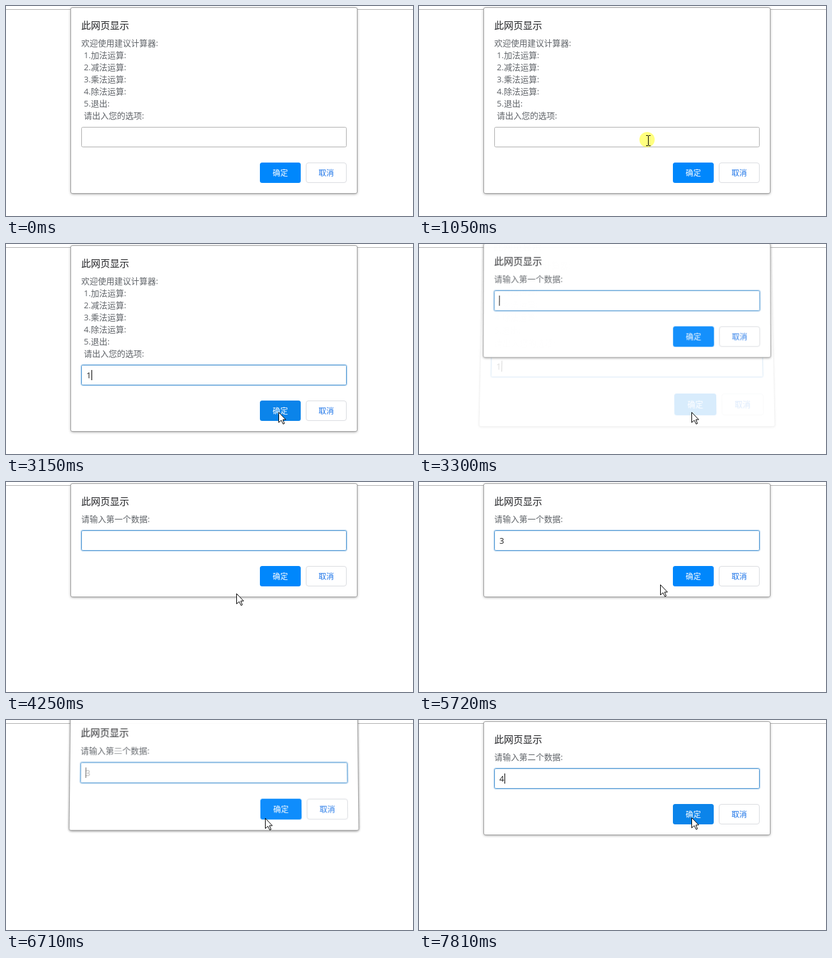
An HTML page with a canvas for the animation above (8 s loop, 638x330 px).

```html
<!DOCTYPE html>
<html lang="zh">
<head>
<meta charset="utf-8">
<title>计算器</title>
<style>
html, body { margin: 0; width: 100%; height: 100%; overflow: hidden; background: #fff; }
canvas { display: block; }
</style>
</head>
<body>
<canvas id="stage" width="638" height="330"></canvas>
<script>
const W = 638, H = 330, LOOP = 8000, MID = 326;
const FONT = '"Open Sans", "Noto Sans CJK SC", "Noto Sans CJK", sans-serif';
const ctx = document.getElementById('stage').getContext('2d');
const layer = document.createElement('canvas');
layer.width = W;
layer.height = H;
const pen = layer.getContext('2d');

const dialogs = [
  { lines: ['欢迎使用建议计算器:', '1.加法运算:', '2.减法运算:', '3.乘法运算:',
            '4.除法运算:', '5.退出:', '请出入您的选项:'],
    focus: 1090, typed: 2110, text: '1', close: 3380 },
  { lines: ['请输入第一个数据:'], focus: 3280, typed: 5210, text: '3', close: 6860 },
  { lines: ['请输入第二个数据:'], focus: 6680, typed: 7600, text: '4', close: Infinity }
];

// Pointer path: time, x, y
const path = [
  [260, 499, 307], [900, 359, 211], [2200, 359, 211], [2510, 405, 254],
  [2760, 427, 264], [3470, 427, 264], [3770, 361, 178], [4220, 361, 178],
  [4400, 360, 162], [5180, 360, 162], [5330, 378, 161], [5720, 378, 161],
  [6180, 398, 158], [6300, 398, 158], [6400, 406, 154], [7560, 406, 154],
  [7810, 427, 153]
];
const clicks = [[1050, 1200], [3000, 3120], [6420, 6540]];

const clamp = v => Math.max(0, Math.min(1, v));
const inputTop = d => 57 + 19 * d.lines.length;

function pointerAt(t) {
  let i = 0;
  while (i < path.length - 1 && path[i + 1][0] <= t) i++;
  const a = path[i], b = path[i + 1] || a;
  const f = b === a ? 0 : clamp((t - a[0]) / (b[0] - a[0]));
  return { x: Math.round(a[1] + (b[1] - a[1]) * f), y: Math.round(a[2] + (b[2] - a[2]) * f) };
}

function box(x, y, w, h, r, fill, stroke, line = 1) {
  pen.beginPath();
  pen.roundRect(x, y, w, h, r);
  if (fill) { pen.fillStyle = fill; pen.fill(); }
  if (stroke) { pen.strokeStyle = stroke; pen.lineWidth = line; pen.stroke(); }
}

function label(text, x, y, size, color, align = 'left') {
  pen.font = size + 'px ' + FONT;
  pen.fillStyle = color;
  pen.textAlign = align;
  pen.fillText(text, x, y);
}

function paintDialog(d, t, p) {
  const top = inputTop(d), by = top + 56;
  pen.clearRect(0, 0, W, H);
  pen.save();
  pen.shadowColor = 'rgba(0,0,0,.5)';
  pen.shadowBlur = 4;
  pen.shadowOffsetY = 1;
  box(102, 3, 448, top + 101, 2, '#fff');
  pen.restore();
  box(101.5, 2.5, 449, top + 102, 2.5, '#fff', '#a0a0a0');

  label('此网页显示', 118, 36, 15, '#202124');
  d.lines.forEach((s, i) => label(s, i ? 122 : 118, 63 + 19 * i, 13, '#5f6368'));

  const focused = t >= d.focus;
  if (focused) {
    box(117.5, top - .5, 417, 33, 2.5, null, '#a9cdec');
    box(118.5, top + .5, 415, 31, 2, '#fff', '#5c9fd6');
  } else {
    box(118.5, top + .5, 415, 31, 2, '#fff', '#b0b0b0');
  }

  const entered = t >= d.typed;
  if (entered) label(d.text, 126, top + 21, 13, '#222');
  const since = t - (entered ? d.typed : d.focus);
  if (focused && Math.floor(since / 500) % 2 === 0) {
    pen.fillStyle = '#000';
    pen.fillRect(entered ? 134 : 126, top + 8, 1, 16);
  }

  const hover = t >= 260 && p.x > 407 && p.x < 462 && p.y > by && p.y < by + 32;
  box(398, by, 64, 32, 3.5, hover ? '#0b84ea' : '#0087fc');
  box(470.5, by + .5, 63, 31, 3.5, '#fff', '#dadce0');
  label('确定', 430, by + 20.5, 12, '#fff', 'center');
  label('取消', 502, by + 20.5, 12, '#1a73e8', 'center');
}

// Lays the layer on the stage, tilted towards the viewer by k.
function place(d, k, alpha) {
  ctx.globalAlpha = alpha;
  if (k <= 0) {
    ctx.drawImage(layer, 0, 0);
  } else {
    const h = inputTop(d) + 104, slope = k * .00024 * h;
    for (let row = 0; row < H; row++) {
      const y = (row + 18 * k + slope * h / 2) / (1 + slope);
      if (y > H - 1) break;
      const s = 1 + k * (.004 + .0001 * y);
      ctx.drawImage(layer, 0, y, W, 1, MID * (1 - s), row, W * s, 1);
    }
  }
  ctx.globalAlpha = 1;
}

function drawDialogs(t, p) {
  const i = dialogs.findIndex(d => t < d.close);
  const d = dialogs[i], left = d.close - t;
  const out = clamp((220 - left) / 140);
  paintDialog(d, t, p);
  place(d, out, left < 80 ? .16 * left / 80 : 1 - .84 * out ** 2.5);
  if (left < 215) {
    const next = dialogs[i + 1], k = (left / 215) ** 1.8;
    paintDialog(next, Math.max(t, next.focus), { x: 0, y: 0 });
    place(next, k, 1 - k ** 1.4);
  }
}

function drawPointer(t, { x, y }) {
  if (t < 260) return;
  if (clicks.some(([a, b]) => t >= a && t < b)) {
    ctx.fillStyle = 'rgba(255,255,0,.5)';
    ctx.beginPath();
    ctx.arc(x - 1.5, y - 1, 12, 0, 7);
    ctx.fill();
  }
  if (t < 3000 && y > 190 && y < 222) {
    ctx.fillStyle = '#000';
    ctx.fillRect(x, y - 7, 1, 15);
    for (const e of [y - 8, y + 8]) {
      ctx.fillRect(x - 3, e, 3, 1);
      ctx.fillRect(x + 1, e, 3, 1);
    }
    return;
  }
  const arrow = [[0, 0], [0, 16], [4, 12.5], [7, 18.5], [9, 17.5], [6.5, 11.5], [11, 11.5]];
  ctx.beginPath();
  for (const [dx, dy] of arrow) ctx.lineTo(x + dx + .5, y + dy + .5);
  ctx.closePath();
  ctx.fillStyle = '#fff';
  ctx.strokeStyle = '#000';
  ctx.lineWidth = 1;
  ctx.fill();
  ctx.stroke();
}

function draw(now) {
  const t = now % LOOP, p = pointerAt(t);
  ctx.fillStyle = '#fff';
  ctx.fillRect(0, 0, W, H);
  ctx.fillStyle = '#b0b0b0';
  ctx.fillRect(0, 5, W, 1);
  drawDialogs(t, p);
  drawPointer(t, p);
}

const start = performance.now();
function tick() {
  draw(performance.now() - start);
  requestAnimationFrame(tick);
}
tick();
</script>
</body>
</html>
```
